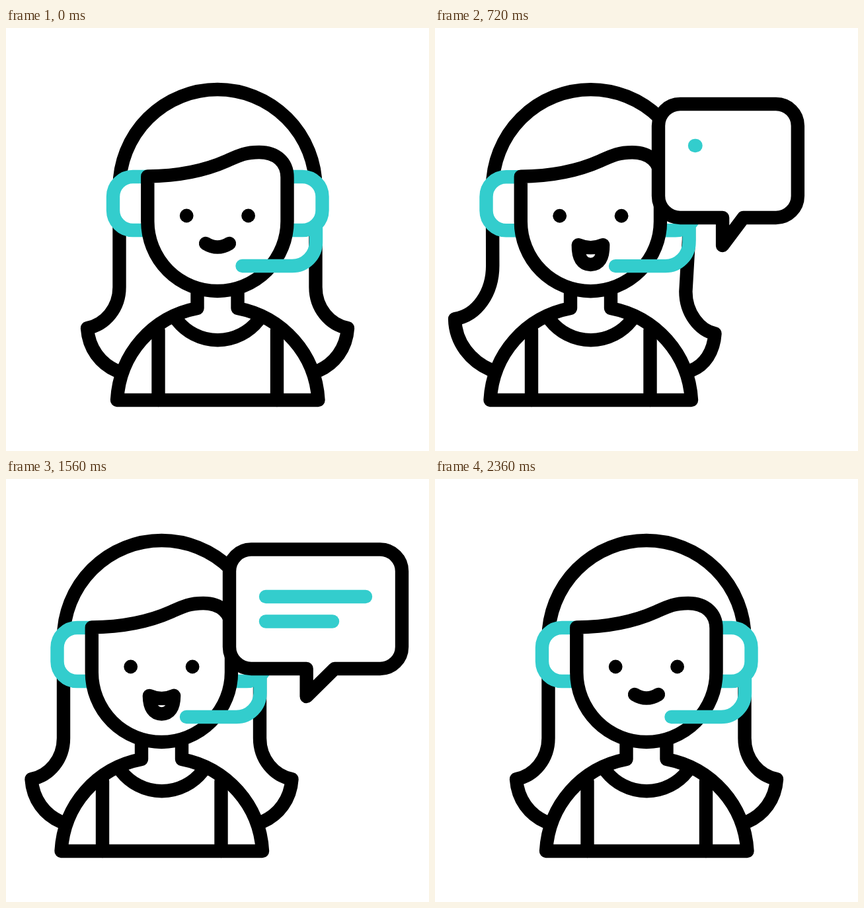
Animation of 640x640 px, one loop 2400 ms. Source, as an HTML page with a canvas:

```html
<!DOCTYPE html>
<html>
<head>
<meta charset="utf-8">
<style>
html, body { margin: 0; width: 100%; height: 100%; overflow: hidden; background: #fff; }
canvas { display: block; }
</style>
</head>
<body>
<canvas id="stage" width="640" height="640"></canvas>
<script>
const ctx = document.getElementById('stage').getContext('2d');
const BLACK = '#000', TEAL = '#33cdcd', WHITE = '#fff';
const LOOP = 2400;

const ease = (t, from, to) => {
  const u = Math.min(1, Math.max(0, (t - from) / (to - from)));
  return u * u * (3 - 2 * u);
};
const pulse = (t, from, peak, to) => ease(t, from, peak) - ease(t, peak, to);
const mix = (a, b, k) => a + (b - a) * k;

function draw(path, color, fill) {
  const shape = new Path2D(path);
  if (fill) {
    ctx.fillStyle = fill;
    ctx.fill(shape);
  }
  ctx.strokeStyle = color;
  ctx.stroke(shape);
}

function dot(x, y) {
  ctx.fillStyle = BLACK;
  ctx.beginPath();
  ctx.arc(x, y, 10.4, 0, 7);
  ctx.fill();
}

// outer: drop of the head outline; leftDrop, rightDrop: drop of each lock
function drawHair(sway, outer, leftDrop, rightDrop) {
  const point = drop => (x, y, swayX, swayY) => `${mix(x, swayX, sway)},${mix(y, swayY, sway) + drop} `;
  const l = point(leftDrop), r = point(rightDrop);
  draw(`M171.5,${241.5 + outer}a148.5,148.5 0 0 1 297,0`, BLACK);
  draw('M171.5,' + (241.5 + outer) + 'L' + l(171.5, 392, 172, 328) +
    'C' + l(171.5, 424, 172, 377) + l(150, 449, 147, 421) + l(123, 454, 106.5, 426.5) +
    'C' + l(125, 485, 106, 468) + l(143, 508, 135, 500) + l(168, 519, 169, 515), BLACK);
  draw('M468.5,' + (241.5 + outer) + 'V' + (320 + outer) + 'L' + r(468.5, 392, 459.5, 405) +
    'C' + r(468.5, 424, 459.5, 438) + r(490, 449, 480, 466) + r(517, 454, 499.5, 470) +
    'C' + r(515, 485, 498, 495) + r(497, 508, 488, 512) + r(472, 519, 473, 517), BLACK);
}

function drawBody() {
  draw('M289.5,390V424C222,437 172,493 168,563H472.5C468.5,493 418,437 350.5,424V390', BLACK, WHITE);
  draw('M259,442.5A78,78 0 0 0 381.5,442.5M230.5,457V563M410,457V563', BLACK);
}

function drawMouth(open, inner) {
  const m = (a, b) => mix(a, b, open);
  const half = m(18, 18.7), y = m(326, 328) + inner;
  const bottom = m(331.5, 357.7) + inner, cheek = m(329.7, 348) + inner;
  const near = m(12, 19), far = m(6, 12.5);
  const c = 320;
  draw(`M${c - half},${y}Q${c},${m(337, 336) + inner} ${c + half},${y}
    C${c + near},${cheek} ${c + far},${bottom} ${c},${bottom}
    C${c - far},${bottom} ${c - near},${cheek} ${c - half},${y}Z`,
    BLACK, open > 0.9 ? WHITE : BLACK);
}

function drawHead(open, outer, inner) {
  const top = 225 + inner;
  draw(`M214,${top}H192a30,30 0 0 0 -30,30v21a30,30 0 0 0 30,30H214`, TEAL, WHITE);
  draw(`M425,${top}H448.5a30,30 0 0 1 30,30v21a30,30 0 0 1 -30,30H425`, TEAL, WHITE);
  draw(`M214.3,${224.5 + inner}c43,-.5 83,-7 120,-23.5c19,-8.5 28,-13 48.7,-13
    c26,0 42.5,15 42.5,38V${292.5 + outer}a105.6,105.6 0 0 1 -211.2,0Z`, BLACK, WHITE);
  dot(273.2, 284 + inner);
  dot(366.6, 284 + inner);
  drawMouth(open, inner);
  draw(`M469,${303 + inner}V${324 + outer}a36,36 0 0 1 -36,36H357.5`, TEAL);
}

function drawBubble(t) {
  const p = ease(t, 300, 900);
  const w = mix(26.6, 261, p), h = mix(141, 180.5, p);
  const rx = Math.min(33, w * 0.45), ry = 33;
  const x = k => 338 + w * k;
  const corner = (dx, dy) => `a${rx},${ry} 0 0 1 ${dx},${dy}`;
  const tail = x(mix(0.51, 0.447, p));
  draw(`M${338 + rx},${287 - h}H${x(1) - rx}${corner(rx, ry)}V${287 - ry}${corner(-rx, ry)}
    H${x(0.61)}L${tail},329V287H${338 + rx}${corner(-rx, -ry)}V${287 - h + ry}${corner(rx, -ry)}Z`,
    BLACK, WHITE);
  if (t > 700) draw(`M393,178h${151 * ease(t, 700, 1050)}`, TEAL);
  if (t > 875) draw(`M393,215.5h${101 * ease(t, 875, 1225)}`, TEAL);
}

function render(t) {
  const aside = ease(t, 100, 400) - ease(t, 1900, 2300);
  const sway = 1.215 * pulse(t, 200, 500, 900);
  const nod = pulse(t, 700, 1100, 1500);
  const lateNod = pulse(t, 900, 1100, 1500);
  const open = aside - 0.31 * pulse(t, 900, 1300, 1700);
  const outer = 19 * nod, inner = 31.2 * nod;

  ctx.fillStyle = WHITE;
  ctx.fillRect(0, 0, 640, 640);
  ctx.lineWidth = 20.4;
  ctx.lineCap = ctx.lineJoin = 'round';

  ctx.save();
  ctx.translate(-84.5 * aside, 0);
  drawHair(sway, outer, inner, 31.2 * lateNod);
  drawBody();
  drawHead(open, outer, inner);
  ctx.restore();

  if (t >= 300) {
    ctx.save();
    ctx.translate(0, -354 * ease(t, 1900, 2400));
    drawBubble(t);
    ctx.restore();
  }
}

const start = performance.now();
function tick() {
  render((performance.now() - start) % LOOP);
  requestAnimationFrame(tick);
}
tick();
</script>
</body>
</html>
```
